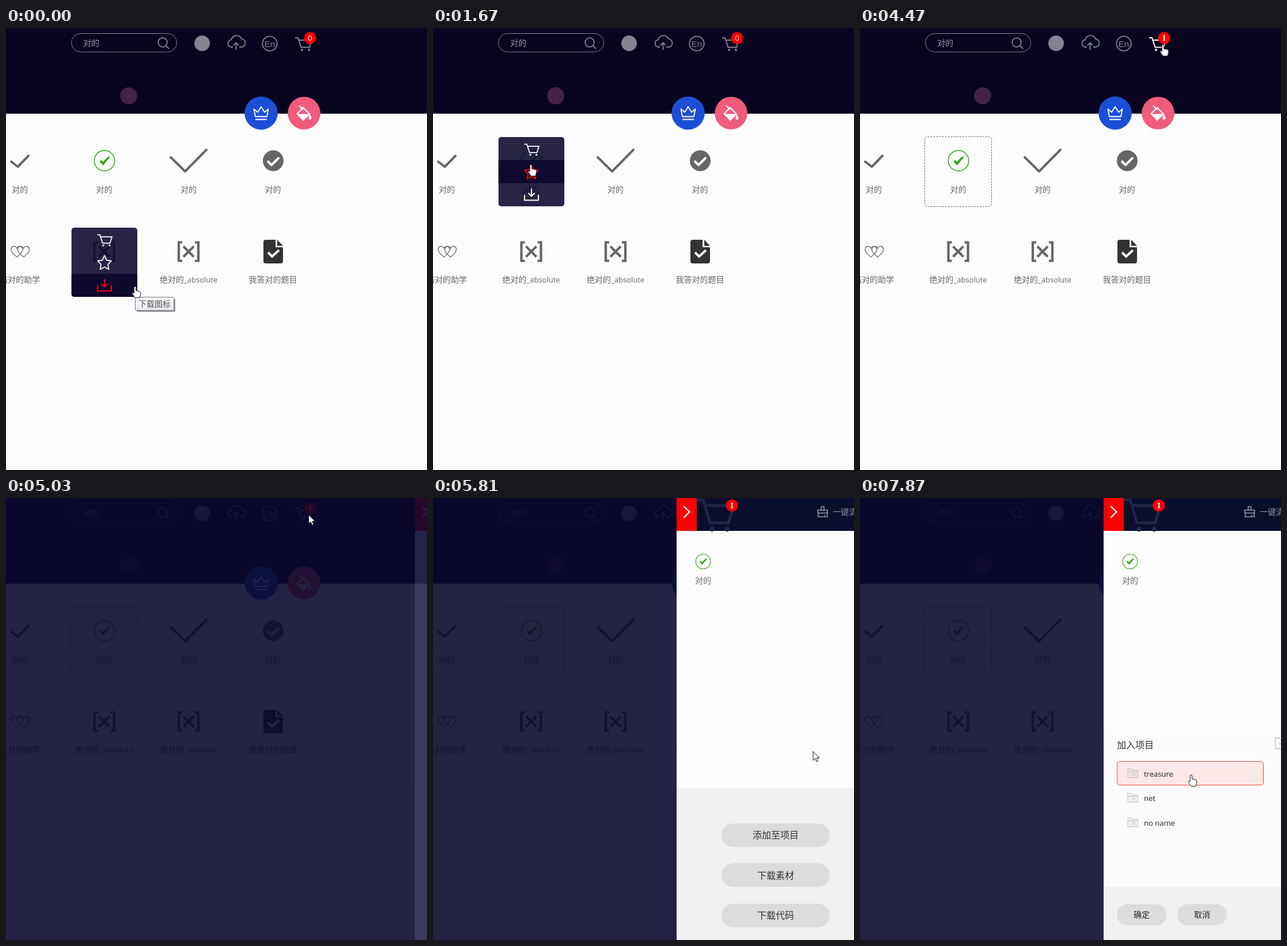
An HTML page that plays this animation: 731 by 766 pixels, repeating every 8 s.

```html
<!DOCTYPE html>
<html lang="zh">
<head>
<meta charset="utf-8">
<title>图标购物车</title>
<style>
html, body { margin: 0; width: 100%; height: 100%; overflow: hidden; background: #fcfcfc; }
svg { display: block; width: 100vw; height: 100vh; }
text { font: 14px "Open Sans", "Noto Sans CJK SC", sans-serif; fill: #666; }
.mid { text-anchor: middle; }
.latin { font-size: 13px; }
.big { font-size: 16px; fill: #333; }
.dark { fill: #222; }
.line { fill: none; stroke: currentColor; }
.nav { color: #85838f; stroke-width: 1.8; }
.count { fill: #fff; font-size: 13px; }
.one { font: bold 14px "Liberation Serif", serif; }
</style>
</head>
<body>
<svg viewBox="0 0 731 766">
  <defs>
    <linearGradient id="tipFill" x2="0" y2="1">
      <stop stop-color="#fff"/><stop offset="1" stop-color="#e4e5f0"/>
    </linearGradient>
    <clipPath id="cardClip"><rect width="114.5" height="120" rx="5"/></clipPath>
    <g id="cart" stroke-width="2">
      <path class="line" d="M0 1h5l5.500 16.500H25l4-12.500H7"/>
      <g fill="currentColor"><circle cx="12" cy="22" r="1.9"/><circle cx="24" cy="22" r="1.9"/></g>
    </g>
    <g id="greenCheck" color="#2fa411">
      <circle class="line" r="17.8" stroke-width="1.5"/>
      <path fill="currentColor" d="M-9 1l3.5-2 3 3.2C.5-2 4-5.5 8.5-8L9-5C4.5-1 1.5 3-2 8z"/>
    </g>
    <g id="bracketX" class="line" color="#666" stroke-width="4.2">
      <path d="M-11-16h-6v32h6M11-16h6v32h-6M-9-9L9 9M9-9L-9 9"/>
    </g>
    <path id="heart" class="line" color="#666" stroke-width="1.3"
      d="M19 382c-2-5-10-5-10 2 0 6 6 9 10 13 4-4 10-7 10-13 0-7-8-7-10-2z"/>
    <g id="folder" class="line" color="#c6c6c9" stroke-width="1.3">
      <path d="M.7 15.5V.7H7l1.5 2.5h9v12.300zM.7 5.500h17M4 9h2M8 9h6M4 12h2M8 12h6"/>
    </g>
  </defs>

  <rect width="731" height="766" fill="#fcfcfc"/>
  <rect width="731" height="148.5" fill="#080520"/>
  <circle cx="213" cy="117.5" r="14.7" fill="#43214b"/>

  <g class="line nav">
    <rect x="113.5" y="9.5" width="183" height="32" rx="16" stroke-width="1"/>
    <circle cx="272" cy="25" r="7.8"/>
    <path d="M278 31l5 5"/>
    <path d="M394 33h-2a6 6.3 0 0 1-1-12.6 9.5 9.5 0 0 1 18-1.5 7 7 0 0 1-1 14.1h-3M399.5 38V26M395 30l4.5-4.5 4.5 4.5"/>
    <circle cx="458" cy="27" r="12.7"/>
  </g>
  <circle cx="340.5" cy="26.5" r="13.5" fill="#858392"/>
  <text x="134" y="31" style="fill:#9a98a3">对的</text>
  <text class="mid" x="458" y="32.5" style="font:15px 'Liberation Sans',sans-serif;fill:#85838f">En</text>
  <use id="navCart" href="#cart" x="502" y="16"/>
  <circle id="pulse" cx="529.5" cy="17" fill="red"/>
  <circle cx="528" cy="17.5" r="10.5" fill="red"/>
  <text id="count" class="count mid" x="528" y="22.3"></text>

  <circle cx="443" cy="147.5" r="28.8" fill="#1c4fd6"/>
  <path class="line" color="#fff" stroke-width="1.8" stroke-linejoin="round"
    d="M433 153.5l-2.500-13 6.500 5.500 6-9.500 6 9.500 6.500-5.500-2.500 13zM433 158.500h20"/>
  <circle cx="517.5" cy="147.5" r="28.3" fill="#f05c7b"/>
  <g color="#fff" fill="#fff">
    <path class="line" stroke-width="2" d="M505.5 148.5L516 138l11 11-11 10.5zM509 134.5l7 7"/>
    <path d="M505 149h22l-11 11zM528 150q4 6 1.8 8.3a3 3 0 0 1-4-.4q-1.5-3 2.2-7.9z"/>
  </g>

  <g class="line" color="#666" stroke-width="4" stroke-linecap="round" stroke-linejoin="round">
    <path d="M9 231.5l11.5 9L39 221.5"/>
    <path d="M286 224l25 24.5 37-37.5"/>
  </g>
  <use href="#greenCheck" x="171" y="230"/>
  <circle cx="464" cy="230" r="18" fill="#666"/>
  <path class="line" color="#fff" stroke-width="4" d="M454 230.5l7 7 13-13"/>
  <use href="#heart"/><use href="#heart" x="11.5"/>
  <use href="#bracketX" x="170.5" y="387.5"/><use href="#bracketX" x="317" y="387.5"/>
  <path fill="#333" d="M451 367h17v13h13v24a4 4 0 0 1-4 4h-26a4 4 0 0 1-4-4v-33a4 4 0 0 1 4-4zM471 367l10 10.500h-10z"/>
  <path class="line" color="#fff" stroke-width="4" d="M455 389l7 7 12-11"/>

  <g class="mid">
    <text x="24" y="285">对的</text><text x="170.5" y="285">对的</text>
    <text x="317" y="285">对的</text><text x="463.5" y="285">对的</text>
    <text x="24" y="441">结对的助学</text>
    <text x="170.5" y="441">绝对的<tspan class="latin">_absolute</tspan></text>
    <text x="317" y="441">绝对的<tspan class="latin">_absolute</tspan></text>
    <text x="463.5" y="441">我答对的题目</text>
  </g>

  <g id="card" clip-path="url(#cardClip)" fill="#0a062d" fill-opacity=".88">
    <rect width="114.5" height="120"/>
    <rect id="cell" width="114.5" height="40"/>
    <g class="tool" fill-opacity="1">
      <use href="#cart" transform="translate(45 11.5) scale(.88)"/>
      <path id="filled" fill="currentColor" d="M50 16h4a6 6 0 0 1 11 0h5l-4 12H54z"/>
    </g>
    <path class="tool line" stroke-width="1.8" stroke-linejoin="round"
      d="M57.5 48.500l3.700 7.900 8.300 1.200-6 6.100 1.400 8.600-7.400-4-7.400 4 1.400-8.600-6-6.100 8.300-1.200z"/>
    <path class="tool line" stroke-width="2" d="M45.5 100v9.500h24V100M57.500 89v13M52 97l5.500 5.500 5.500-5.500"/>
  </g>
  <rect id="dashes" x="112.5" y="188.5" width="116" height="121" rx="5" class="line" color="#666" stroke-dasharray="3 2"/>

  <g id="tooltip">
    <rect x="227" y="469" width="67" height="23" rx="2" fill="#000" opacity=".4"/>
    <rect x="224.5" y="466.500" width="67" height="23" rx="1" fill="url(#tipFill)" stroke="#767676"/>
    <text x="230" y="482.500" style="fill:#555">下载图标</text>
  </g>

  <rect id="shade" width="731" height="766" fill="#0a082e" opacity=".89"/>

  <g id="panel">
    <rect width="344" height="766" fill="#fdfdfd"/>
    <rect width="344" height="57" fill="#0a0e2d"/>
    <use href="#cart" transform="translate(35 1) scale(2.2 2.4)" color="#20264a"/>
    <rect width="35" height="57" fill="red"/>
    <path class="line" color="#fff" stroke-width="2.2" d="M12 14l10.500 10L12 34.500"/>
    <circle cx="96" cy="13" r="10.5" fill="red"/>
    <text class="count one mid" x="96" y="17.8">1</text>
    <path class="line" color="#8e93a5" stroke-width="1.6"
      d="M251 21v-6h5v6M245 26v-5h17v5zM247 26l-1.500 6.500h16.500l-1-6.500M257 32v-3"/>
    <text x="271" y="29" style="fill:#8e93a5">一键清空</text>
    <use href="#greenCheck" transform="translate(46 110) scale(.72)"/>
    <text class="mid" x="46" y="148">对的</text>

    <g id="actions">
      <rect y="502" width="344" height="264" fill="#f1f1f1"/>
      <g fill="#dcdcdc">
        <rect x="78" y="564" width="188" height="41" rx="20.5"/>
        <rect x="78" y="633" width="188" height="41" rx="20.5"/>
        <rect x="78" y="703" width="188" height="41" rx="20.5"/>
      </g>
      <g class="mid">
        <text class="big" x="172" y="590">添加至项目</text>
        <text class="big" x="172" y="659.5">下载素材</text>
        <text class="big" x="172" y="729">下载代码</text>
      </g>
    </g>

    <g id="projects">
      <rect y="400" width="344" height="274" fill="#fafafa"/>
      <rect y="674" width="344" height="92" fill="#f1f1f1"/>
      <text class="big" x="23" y="433.5">加入项目</text>
      <path class="line" color="#bbb" stroke-width="1.3" d="M298.5 434.500v-19h6l2 3h12v16zM304 426h9"/>
      <rect id="rowHover" x="23" width="255" height="42" rx="5" fill="#f2f2f2"/>
      <rect x="23.5" y="456.5" width="254" height="41" rx="5" fill="#fce8e6" stroke="#ea4a3c"/>
      <use href="#folder" x="41.5" y="469"/><use href="#folder" x="41.5" y="511.5"/><use href="#folder" x="41.5" y="554"/>
      <text class="latin dark" x="70" y="482.5">treasure</text>
      <text class="latin dark" x="70" y="525">net</text>
      <text class="latin dark" x="70" y="567.5">no name</text>
      <g fill="#dcdcdc">
        <rect x="23" y="704" width="86" height="36.5" rx="18.2"/>
        <rect x="128" y="704" width="86" height="36.5" rx="18.2"/>
      </g>
      <text class="mid dark" x="66" y="727">确定</text>
      <text class="mid dark" x="171" y="727">取消</text>
    </g>
  </g>

  <g id="cursor" fill="#fff" stroke="#15132a" stroke-linejoin="round">
    <path id="arrow" d="M0 0v15.500l3.600-3.300 2.500 5.800 2.500-1.100L6.100 11.300H11z"/>
    <path id="hand" d="M-1.800 1.500a1.700 1.700 0 0 1 3.400 0v5.500l6 1.300c1.600.4 2.200 1.200 2.200 2.700 0 3-1 5-1.800 8.500H0c-1.500-3-4-5-5-8 0-1.600 2-1.600 3 0l.2.500z"/>
  </g>
</svg>
<script>
const LOOP = 8000, ADDED = 2450, OPENED = 5030, LISTED = 6730;

// Bursts of screen updates: first, last, count
const bursts = [
  [530, 1530, 8], [1670, 2610, 7], [2760, 3780, 9], [3930, 4470, 5],
  [5030, 5940, 8], [6090, 7060, 7], [7210, 7870, 6]
];

// Pointer path: time, x, y
const path = [
  [0, 224, 448], [520, 224, 448], [673, 222, 420], [960, 212, 350], [1100, 200, 310],
  [1245, 185, 275], [1530, 170, 238], [1670, 170, 237], [1985, 172, 215], [2610, 175, 208],
  [2760, 180, 207], [2887, 222, 203], [3015, 273, 197], [3780, 463, 74], [3930, 490, 62],
  [4200, 529, 50], [4470, 526, 29], [5030, 525.5, 29], [5160, 532, 60], [5420, 600, 260],
  [5810, 660, 439], [5940, 655, 448], [6090, 648, 470], [6414, 600, 578], [6576, 595, 580],
  [7060, 590, 573], [7210, 588, 564], [7870, 575, 480], [LOOP, 575, 480]
];

const el = {};
document.querySelectorAll("svg [id]").forEach(node => el[node.id] = node);
const tools = document.querySelectorAll(".tool");
const show = (node, on) => node.style.display = on ? "" : "none";
const move = (node, x, y) => node.setAttribute("transform", `translate(${x} ${y})`);
const clamp = v => Math.max(0, Math.min(1, v));
const easeOut = p => 1 - (1 - p) ** 3;
const inside = ([x, y], left, top, right, bottom) => x >= left && x < right && y >= top && y < bottom;

function snap(t) {
  const burst = bursts.filter(b => b[0] <= t).pop();
  if (!burst) return 0;
  const [first, last, count] = burst, gap = (last - first) / (count - 1);
  return first + gap * Math.min(count - 1, Math.floor((t - first) / gap + 0.15));
}

function pointer(t) {
  const i = Math.max(1, path.findIndex(key => key[0] >= t));
  const [t0, x0, y0] = path[i - 1], [t1, x1, y1] = path[i];
  const p = clamp((t - t0) / (t1 - t0));
  return [x0 + (x1 - x0) * p, y0 + (y1 - y0) * p];
}

const cardTop = pos => [189, 346].find(top => inside(pos, 114, top, 228, top + 120));

function render(time) {
  const t = snap(time), pos = pointer(t);
  const added = t >= ADDED, opened = t >= OPENED, listed = t >= LISTED;

  const hoverPos = pointer(Math.max(0, t - 120)), top = cardTop(hoverPos);
  show(el.card, top !== undefined);
  if (top !== undefined) {
    const active = Math.min(2, Math.floor((hoverPos[1] - top) / 40));
    move(el.card, 113.5, top);
    el.cell.setAttribute("y", active * 40);
    tools.forEach((tool, i) => tool.style.color = i === active ? "red" : "#fff");
  }
  show(el.filled, added);
  show(el.dashes, added);
  show(el.tooltip, t < 600);

  const overCart = !opened && inside(pos, 502, 14, 540, 42);
  el.navCart.style.color = overCart ? "#fff" : "#85838f";
  el.count.textContent = added ? "1" : "0";
  el.count.classList.toggle("one", added);
  const beat = clamp((t - 2480) / 770);
  el.pulse.setAttribute("r", 33 * easeOut(beat));
  el.pulse.setAttribute("opacity", 1 - beat);

  const slide = easeOut(clamp((t - 5002) / 480));
  show(el.shade, opened);
  show(el.panel, opened);
  move(el.panel, 767 - 344 * slide, 0);
  el.panel.setAttribute("opacity", slide ** 1.2);
  show(el.actions, !listed);
  show(el.projects, listed);

  const overRows = listed && inside(pos, 446, 456, 701, 583.5);
  const row = Math.floor((pos[1] - 456) / 42.5);
  show(el.rowHover, overRows && row > 0);
  el.rowHover.setAttribute("y", 456 + row * 42.5);

  const overButton = opened && !listed && inside(pos, 501, 564, 689, 605);
  const overCard = !opened && cardTop(pos) !== undefined;
  const hand = overCart || overRows || overButton || overCard;
  show(el.hand, hand);
  show(el.arrow, !hand);
  move(el.cursor, ...pos);
}

const start = performance.now();
function tick() {
  render((performance.now() - start) % LOOP);
  requestAnimationFrame(tick);
}
tick();
</script>
</body>
</html>
```
